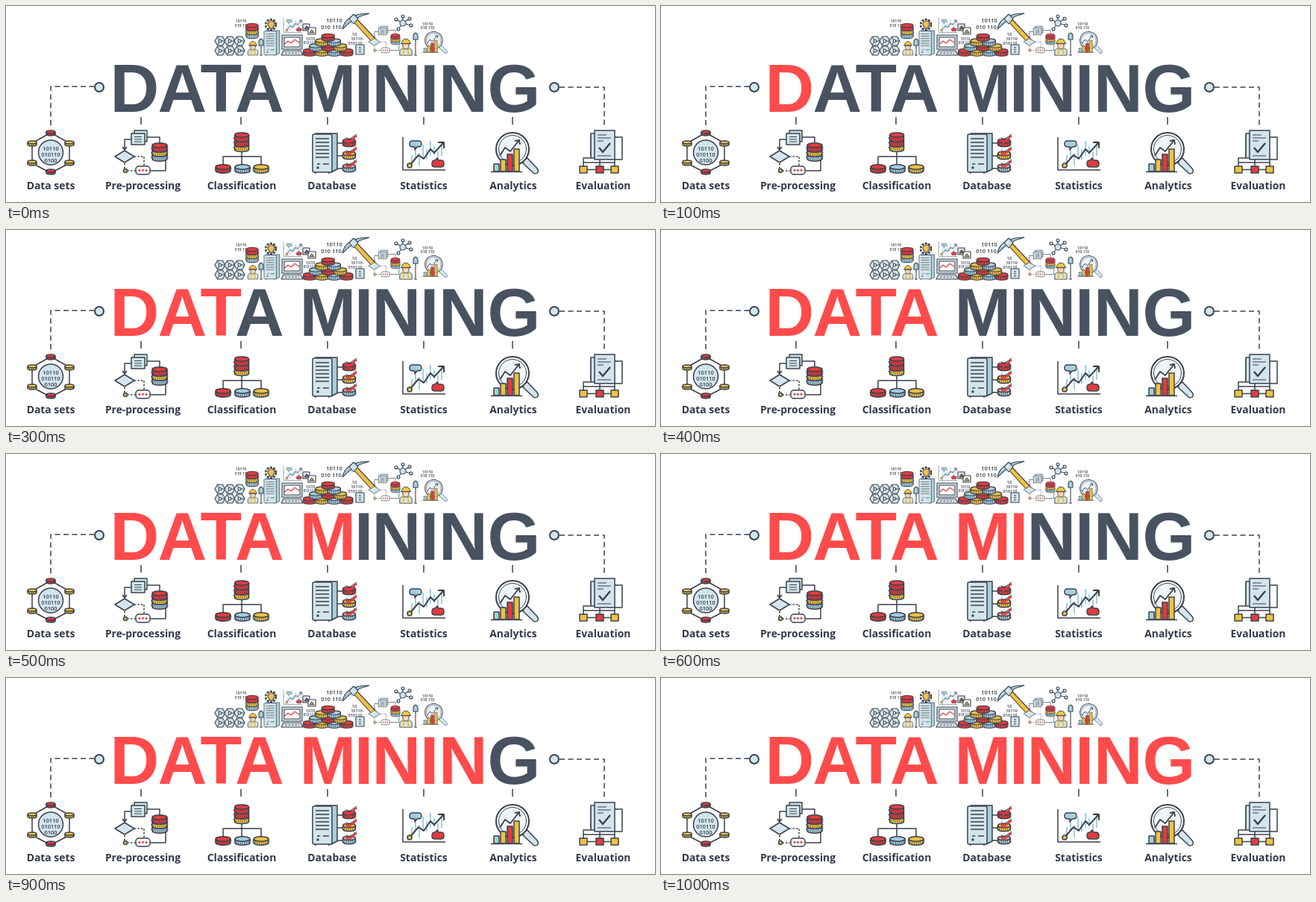
Recreate the animation shown at these times as an HTML page. Size 870 px wide and 263 px high, loop 1500 ms.

```html
<!DOCTYPE html>
<html lang="en">
<head>
<meta charset="utf-8">
<title>Data mining</title>
<style>
html, body { margin: 0; width: 100%; height: 100%; overflow: hidden; background: #fff; }
svg { display: block; }
text { stroke: none; fill: #33394a; text-anchor: middle; font-family: "Open Sans", "Noto Sans", sans-serif; font-weight: 600; }
.label { font-size: 13.9px; font-weight: 700; }
.title { font: bold 91px "Liberation Sans", Arial, sans-serif; text-anchor: start; }
</style>
</head>
<body>
<svg id="stage" width="870" height="263" viewBox="0 0 870 263"></svg>
<script>
const INK = '#39414f', PALE = '#d3e5ec', BLUE = '#a5cedd', RED = '#e23b3d', GOLD = '#f2c23e', WHITE = '#fff';
const DARK = '#485260', LIT = '#ff4b4b';

const path = (d, fill = 'none', more = '') => `<path d="${d}" fill="${fill}" ${more}/>`;
const box = (x, y, w, h, fill = PALE, r = 0) => `<rect x="${x}" y="${y}" width="${w}" height="${h}" rx="${r}" fill="${fill}"/>`;
const dot = (x, y, r, fill = PALE, more = '') => `<circle cx="${x}" cy="${y}" r="${r}" fill="${fill}" ${more}/>`;
const text = (x, y, s, size) => `<text x="${x}" y="${y}" font-size="${size}">${s}</text>`;
const thin = 'stroke-width="1"';
const dashed = 'stroke-dasharray="2.5 2"';
const repeat = (n, fn) => Array.from({ length: n }, (_, i) => fn(i)).join('');

// A coin: (x, y) is the centre of its top face.
function coin(x, y, r, fill, h = 4) {
  const e = r * .32;
  return path(`M${x - r} ${y}v${h}a${r} ${e} 0 0 0 ${2 * r} 0v${-h}`, fill) +
    path(`M${x - r} ${y + h / 2}a${r} ${e} 0 0 0 ${2 * r} 0`, 'none', `stroke-width="${h * .6}" stroke-dasharray=".7 2"`) +
    `<ellipse cx="${x}" cy="${y}" rx="${r}" ry="${e}" fill="${fill}"/>`;
}
const stack = (x, y, r, fills, h) =>
  fills.map((fill, i) => coin(x, y + i * h, r, fill, h)).reverse().join('');

const page = (x, y, w, h) => box(x, y, w, h) +
  repeat(3, i => path(`M${x + 4} ${y + h * (.3 + .22 * i)}h${w - 8}`, 'none', thin));

const tick = (x, y) => path(`M${x} ${y}l4 5 11-9`, 'none', `stroke="${RED}" stroke-width="2.6"`) +
  path(`M${x + 1} ${y - 2}l3 4 11-8`, 'none', thin);

const icons = {
  sets: () => path('M60 170L85 184V211L60 224L35 211V184Z') +
    [[60, 169, RED], [35, 183, GOLD], [85, 183, GOLD], [35, 209, GOLD], [85, 209, GOLD], [60, 221, RED]]
      .map(([x, y, c]) => coin(x, y, 6, c, 3)).join('') +
    dot(60, 196.5, 16.5) + text(60, 194, '10110', 7.5) + text(60, 202, '010110', 7.5) + text(60, 210, '0100', 7.5),

  flow: () => path('M168 179H159V192M156 189l3 4 3-4M189 176H206V183M214 206V221H194') +
    path('M159 211V221H173', 'none', dashed) + path('M172 202H185V214', 'none', dashed) +
    box(172, 167, 17, 15) + page(168, 171, 18, 15) +
    path('M146 202l13-8 13 8-13 8Z', PALE) + dot(160, 221, 2.5, GOLD) +
    stack(206, 187, 10, [RED, GOLD, BLUE], 6) +
    box(174, 215, 19, 11, WHITE, 4) + repeat(3, i => dot(179 + 4.5 * i, 220.5, 1.2, RED, `stroke="${RED}" stroke-width=".6"`)),

  tree: () => path('M316 194V213M291 213V202H342V213') +
    stack(316, 173, 9.5, [RED, RED, GOLD], 6.5) +
    coin(291, 216, 10, RED, 5) + coin(317, 216, 10, BLUE, 5) + coin(342, 216, 10, GOLD, 5),

  server: () => path('M415 171H444V219L436 223V175Z', BLUE) + box(411, 172, 26, 51, PALE, 2) +
    repeat(6, i => path(`M415 ${178 + 5 * i}h18`)) +
    path('M417 212h4M425 212h8M415 223v2M433 223v2') + dot(418, 217, 1, RED),

  checks: () => [RED, GOLD, BLUE].map((fill, i) => {
    const y = 181 + 17 * i;
    return path(`M444 ${y + 3}h8`) + coin(460, y, 8.5, fill, 5) + tick(455, y - 3);
  }).join(''),

  chart: () => repeat(9, i => path(`M${544 + 5 * i} ${[200, 193, 197, 186, 192, 181, 188, 195, 181][i]}v${[16, 12, 17, 18, 14, 20, 12, 9, 20][i]}`, 'none', `stroke="${BLUE}" stroke-width="2"`)) +
    path('M532 176V220H589') +
    path('M541 214L553 200L560 205L569 192L574 197L586 184M579 183H587V191', 'none', 'stroke-width="2"') +
    dot(541, 214, 3, GOLD) +
    path('M544 181h9q4 0 4 4t-4 4h-2l-3 4v-4h-3q-4 0-4-4t4-4Z', BLUE) +
    path('M575 207l3-3 2 3h3q4 0 4 4.500t-4 4.500h-8q-4 0-4-4.500t4-4.500Z', RED),

  lens: () => dot(679, 192, 22, WHITE, 'stroke-width="2"') + dot(679, 192, 18.5, '#edf5f8', thin) +
    [[654, 212, BLUE], [663, 206, GOLD], [672, 199, RED], [681, 192, GOLD]]
      .map(([x, y, c]) => box(x, y, 7, 222 - y, c)).join('') +
    path('M650 222.500H692') + path('M662 201L669 190L676 195L688 180M682 181l6-1 1 6', 'none', 'stroke-width="1.8"') +
    path('M695 207l4-3 13 14q3 4 0 6t-5 0l-14-13Z', PALE),

  report: () => path('M784 204V174H790M784 204H774V215M796 206V215M815 176H826V206H816V215M774 210H816') +
    box(784, 171, 28, 33) + box(789, 167, 27, 39) +
    path('M793 173h12M793 177h18M793 181h8M793 201h18', 'none', thin) +
    path('M795 190l5 6 10-12', 'none', 'stroke-width="2.4"') +
    box(769, 215, 10, 9, GOLD) + box(791, 215, 10, 9, RED) + box(811, 215, 10, 9, GOLD) +
    path('M779 219.500H791M801 219.500H811'),
};

const small = (name, x, y, scale) => `<g transform="translate(${x} ${y}) scale(${scale})">${icons[name]()}</g>`;

const hex = (x, y) => path(`M${x - 7} ${y}l3.500-6h7l3.500 6-3.500 6h-7Z`, PALE) +
  path(`M${x} ${y}l-3.500-5M${x} ${y}l-3.500 5M${x} ${y}h6`, 'none', thin) + dot(x, y, 1.8, WHITE);

const digger = (x, y, s) => `<g transform="translate(${x} ${y}) scale(${s})">` +
  path('M-10 16V10q0-5 6-5h8q6 0 6 5v6Z', PALE) + path('M-4 5v11M4 5v11', 'none', `stroke="${GOLD}" stroke-width="3"`) +
  path('M-5-3v4a5 5 0 0 0 10 0v-4Z', '#f6d3b5') + path('M-9-3h18M-7-3a7 8 0 0 1 14 0Z', GOLD) + '</g>';

const shovel = (x, y, h) => path(`M${x - 2} ${y + h}h4M${x} ${y + 8}v${h - 8}`) +
  path(`M${x - 3} ${y + 8}v-5q0-3 3-4 3 1 3 4v5Z`, BLUE);

const pile = () => [0, 1, 2, 3].map(row => repeat(4 - row, i =>
  coin(407 + 16.5 * i + 8.25 * row, 60 - 6.7 * row, 8.5, [RED, GOLD, BLUE][(i + 2 * row) % 3], 4.5))).join('');

const pickaxe = () => path('M465 20l4-4 28 30-4 5Z', GOLD) +
  path('M451 31Q455 10 487 10Q466 15 451 31Z', BLUE) +
  path('M460 17l6-6 6 6-6 7Z', PALE);

const net = () => [[523, 18], [532, 14], [541, 17], [543, 26], [526, 31]]
  .map(([x, y]) => path(`M532 23L${x} ${y}`) + dot(x, y, 2, PALE)).join('') + dot(532, 23, 4, PALE);

const banner = () => `<g stroke-width="1.100">` +
  [[287, 47], [300, 47], [313, 47], [287, 60], [300, 60], [313, 60]].map(p => hex(...p)).join('') +
  text(315, 22, '10110', 5) + text(316, 28, '010 110', 5) +
  stack(330, 26, 8, [RED, GOLD, BLUE], 5) +
  digger(331, 55, .68) + shovel(342, 45, 21) +
  small('server', 87, -74.7, .63) +
  dot(355, 25, 7, WHITE, 'stroke-width="2.5" stroke-dasharray="3 1.500"') + path('M353 30v-2a4.500 4.500 0 1 1 5 0v2Z', GOLD) +
  small('chart', 138, -61.4, .44) +
  box(398, 24, 9, 9) + box(405, 29, 10, 9, WHITE) + path('M400 31l3-4 3 4Z', RED) + path('M407 36l3-4 3 4Z', GOLD) +
  box(370, 39, 27, 19) + box(373, 42, 21, 13, WHITE) + path('M374 51l4-4 4 3 5-5 6 4', 'none', `stroke="${RED}"`) +
  path('M372 60H395L398 66H369Z', PALE) + path('M374 63H393', 'none', dashed) +
  text(408, 46, '10110', 4.5) + text(407, 51, '010 110', 4.5) +
  pile() + text(440, 22, '10110', 7.5) + text(436, 31, '010 110', 7.5) +
  text(467, 40, '10', 5.5) + text(470, 46, '10110', 5.5) + text(468, 52, '010110', 5.5) + pickaxe() +
  page(469, 52, 11, 13) + small('flow', 398.4, -73, .6) +
  net() + digger(536, 53, .82) + shovel(549, 37, 29) +
  text(565, 26, '10110', 5) + text(565, 31, '010 110', 5) +
  small('lens', 213.5, -55.6, .53) + '</g>';

const links = () => path('M60 160V108H118M742 109H802V160', 'none', 'stroke-dasharray="7 4.500"') +
  dot(125, 109, 6, PALE, 'stroke-width="2"') + dot(735, 109, 6, PALE, 'stroke-width="2"') +
  [181, 315, 431, 560, 679].map(x => path(`M${x} 149v10`)).join('');

const labels = [[60, 'Data sets'], [183.5, 'Pre-processing'], [316, 'Classification'], [437, 'Database'],
  [560, 'Statistics'], [680, 'Analytics'], [800.5, 'Evaluation']];
const title = [['D', 139.5], ['A', 203.5], ['T', 260.5], ['A', 307], ['M', 393.5],
  ['I', 467], ['N', 490.5], ['I', 555], ['N', 580], ['G', 645.5]];

stage.innerHTML = `<g stroke="${INK}" stroke-width="1.500" stroke-linejoin="round">` +
  banner() + links() + Object.values(icons).map(draw => draw()).join('') + '</g>' +
  labels.map(([x, s]) => `<text class="label" x="${x}" y="246">${s}</text>`).join('') +
  title.map(([s, x]) => `<text class="title" x="${x}" y="142">${s}</text>`).join('');

const letters = [...document.querySelectorAll('.title')];

// One more letter lights up every 100 ms, then the full title holds.
function frame() {
  const lit = Math.floor(performance.now() % 1500 / 100);
  letters.forEach((letter, i) => letter.style.fill = i < lit ? LIT : DARK);
  requestAnimationFrame(frame);
}
frame();
</script>
</body>
</html>
```
